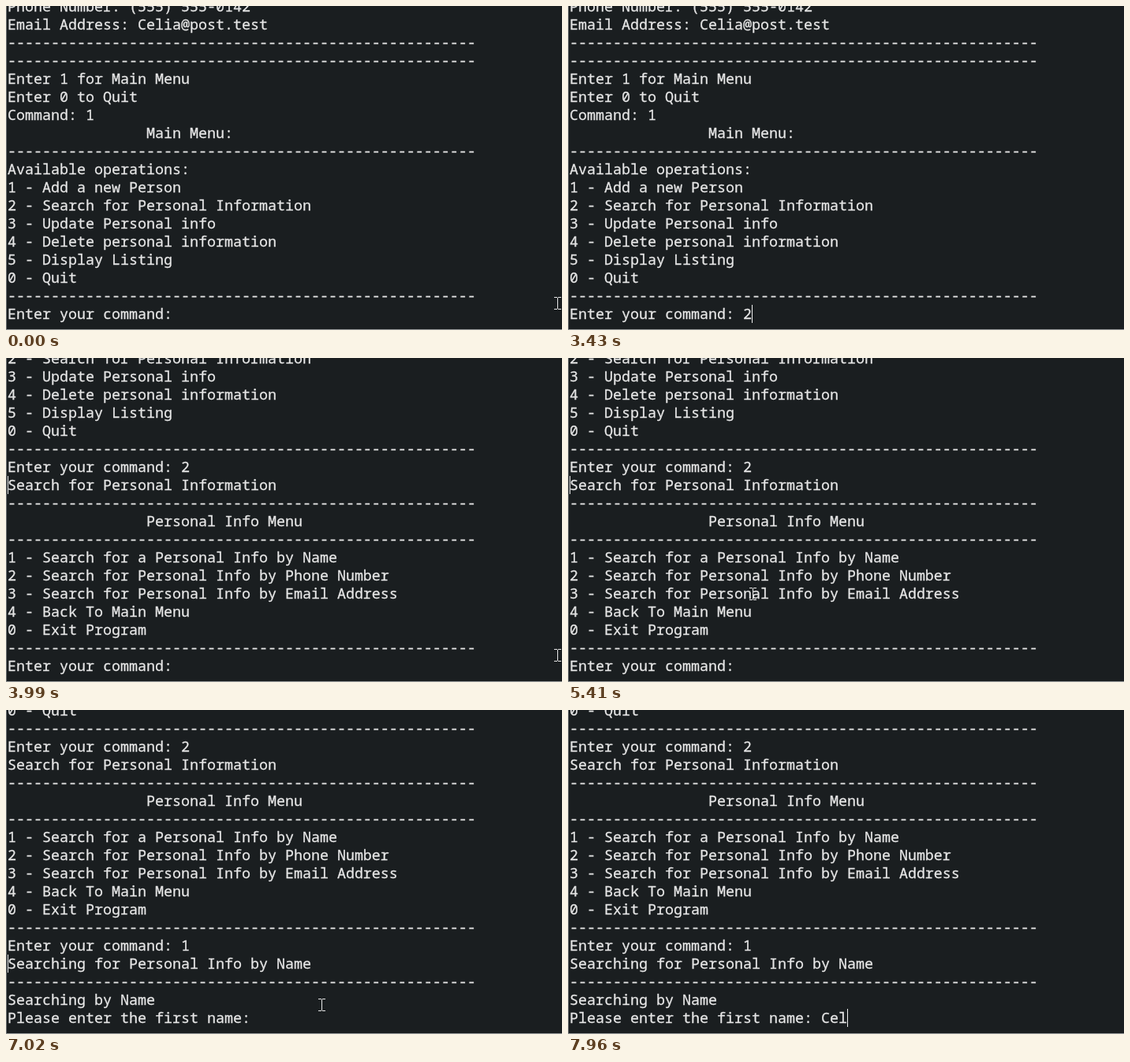
Write an HTML page that moves like this. It is 705 by 412 pixels and loops after 8000 ms.

```html
<!DOCTYPE html>
<html lang="en">
<head>
<meta charset="utf-8">
<title>Contact book terminal</title>
<style>
  html, body { margin: 0; width: 100%; height: 100%; overflow: hidden; background: #1a1e20; }
  #stage { position: relative; width: 705px; height: 412px; overflow: hidden; background: #1a1e20; }
  #log {
    position: absolute; left: 2px; top: -1px; margin: 0; white-space: pre; color: #e6e6e6;
    font: 18.333px/23px "Noto Sans Mono", "DejaVu Sans Mono", monospace;
    font-variant-ligatures: none; -webkit-text-stroke: .3px currentColor;
  }
  #caret { position: absolute; left: 0; top: 0; width: 1px; height: 23px; background: #f0f0f0; }
  #mouse { position: absolute; left: 0; top: 0; }
  #edge { position: absolute; inset: 0; border-left: 1px solid #6c7072; border-bottom: 1px solid #96999a; }
</style>
</head>
<body>
<div id="stage">
  <pre id="log"></pre>
  <div id="caret"></div>
  <svg id="mouse" width="9" height="16" fill="none" stroke="#e8e8e8" shape-rendering="crispEdges">
    <path d="M0 .5H4M5 .5H9M4.5 1V15M0 15.5H4M5 15.5H9"/>
  </svg>
  <div id="edge"></div>
</div>
<script>
const LOOP = 8000, ROW = 23, COL = 11, LEFT = 2, PROMPT_Y = 380;
const KEY_GAP = 130, MOUSE_STEP = 150;
const rule = "-".repeat(54), indent = " ".repeat(16);

const lines = [
  "Phone Number: (555) 555-0142",
  "Email Address: Celia@post.test",
  rule,
  rule,
  "Enter 1 for Main Menu",
  "Enter 0 to Quit",
  "Command: 1",
  indent + "Main Menu:",
  rule,
  "Available operations:",
  "1 - Add a new Person",
  "2 - Search for Personal Information",
  "3 - Update Personal info",
  "4 - Delete personal information",
  "5 - Display Listing",
  "0 - Quit",
  rule,
  "Enter your command: 2",
  "Search for Personal Information",
  rule,
  indent + "Personal Info Menu",
  rule,
  "1 - Search for a Personal Info by Name",
  "2 - Search for Personal Info by Phone Number",
  "3 - Search for Personal Info by Email Address",
  "4 - Back To Main Menu",
  "0 - Exit Program",
  rule,
  "Enter your command: 1",
  "Searching for Personal Info by Name",
  rule,
  "Searching by Name",
  "Please enter the first name: Cel"
];

// Each scene ends at a prompt line; its last `answer` characters are typed from `typeAt`.
// Until then the caret blinks on `caretRow`, starting at `blinkAt`.
const scenes = [
  { from: 0, prompt: 17, answer: 1, typeAt: 3430, caretRow: 17, blinkAt: 250, blink: 515 },
  { from: 3850, prompt: 17, answer: 0, lift: 17, caretRow: 18 },
  { from: 3990, prompt: 28, answer: 1, typeAt: 6430, caretRow: 18 },
  { from: 7020, prompt: 32, answer: 3, typeAt: 7700, caretRow: 29 }
];

// [time, left, top]
const route = [
  [4960, 695, 370], [5110, 696, 371], [5260, 563, 388], [5410, 230, 292],
  [5710, 282, 258], [6010, 459, 305], [6310, 396, 367]
];

const [log, caret, mouse] = ["log", "caret", "mouse"].map(id => document.getElementById(id));
const clamp = (v, lo, hi) => Math.min(hi, Math.max(lo, v));

function place(el, visible, x, y) {
  el.style.visibility = visible ? "visible" : "hidden";
  el.style.transform = `translate(${x}px, ${y}px)`;
}

function pointerAt(t) {
  const start = route[0][0], end = route.at(-1)[0];
  const held = start + Math.floor((t - start) / MOUSE_STEP) * MOUSE_STEP;
  const time = clamp(held, start, end);
  const next = Math.max(1, route.findIndex(point => point[0] >= time));
  const [t0, x0, y0] = route[next - 1], [t1, x1, y1] = route[next];
  const k = (time - t0) / (t1 - t0);
  return [x0 + (x1 - x0) * k, y0 + (y1 - y0) * k].map(Math.round);
}

function draw(now) {
  const t = now % LOOP;
  const scene = scenes.findLast(s => s.from <= t);
  const { from, prompt, answer, typeAt = LOOP, lift = 0, caretRow, blinkAt = from, blink = 560 } = scene;

  const typed = clamp(Math.floor((t - typeAt) / KEY_GAP) + 1, 0, answer);
  const line = lines[prompt];
  const chars = line.length - answer + typed;
  const text = [...lines.slice(0, prompt), line.slice(0, chars)].join("\n");
  if (log.textContent !== text) log.textContent = text;
  const top = PROMPT_Y - lift - prompt * ROW;
  place(log, true, 0, top);

  const typing = typed > 0;
  const row = typing ? prompt : caretRow;
  const col = row === prompt ? chars : 0;
  const lit = Math.floor((t - blinkAt) / blink) % 2 === 0;
  place(caret, typing || lit, LEFT + col * COL, top + row * ROW);
  place(mouse, !typing, ...pointerAt(t));
}

function tick() {
  draw(performance.now());
  requestAnimationFrame(tick);
}
tick();
</script>
</body>
</html>
```
